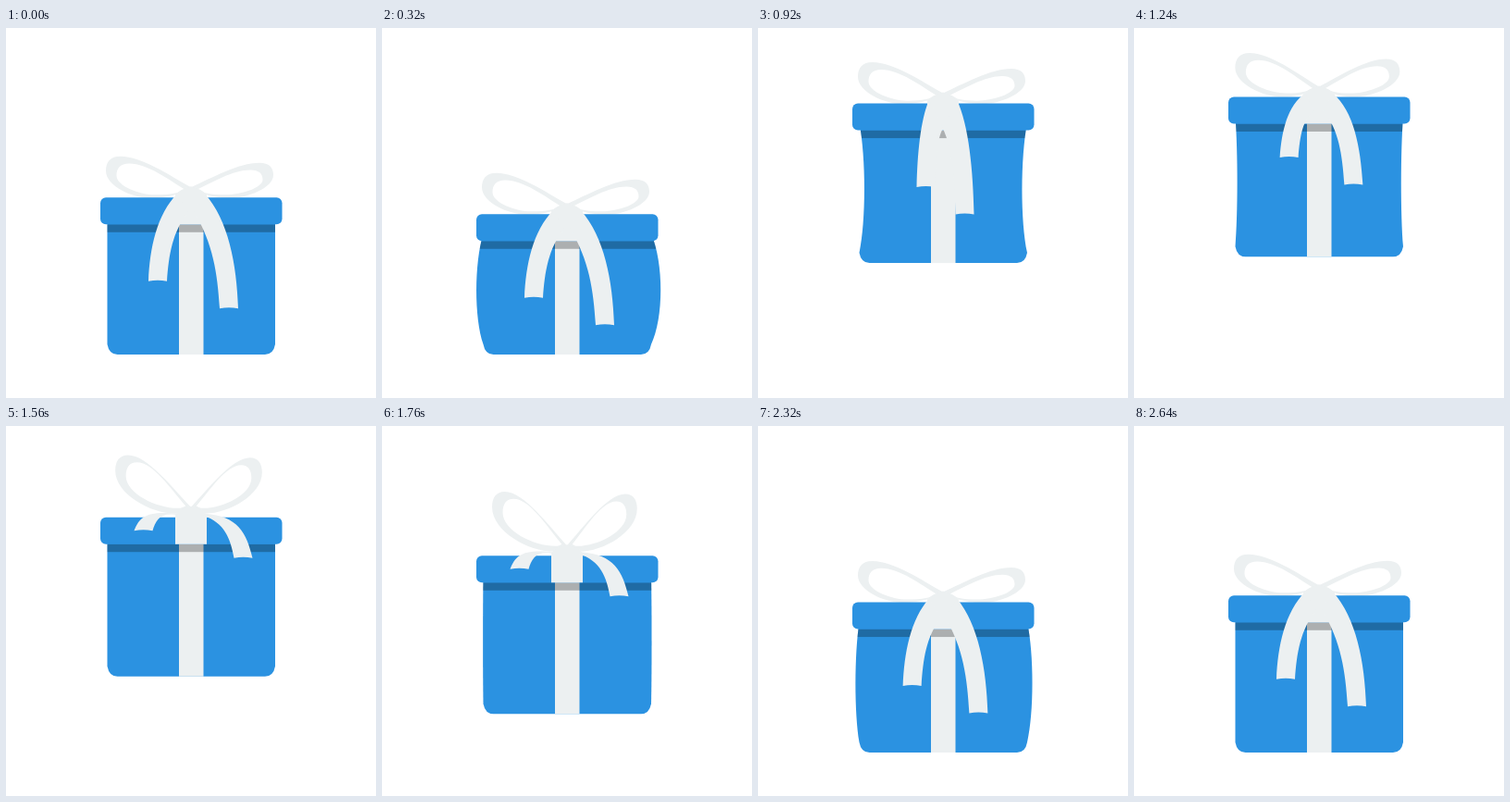
Recreate the animation shown at these times as an HTML page with a canvas. Size 400 by 400 pixels, loop 3.56 s.

```html
<!DOCTYPE html>
<html lang="en">
<head>
<meta charset="utf-8">
<title>Jumping gift</title>
<style>
  html, body { margin: 0; width: 100%; height: 100%; overflow: hidden; background: #fff; }
  canvas { display: block; }
</style>
</head>
<body>
<canvas id="stage" width="400" height="400"></canvas>
<script>
const ctx = document.getElementById('stage').getContext('2d');
const LOOP = 3560, STEP = 40, END = 2640;
const BLUE = '#2b92e1', RIBBON = '#ecf0f1', SHADE = 'rgba(0,0,0,.27)';
const GROUND = 353, BOX_HEIGHT = 169.7, LID = 29, JUMP = 106, APEX = 1200;

const mix = (a, b, k) => a + (b - a) * k;

// Smooth step from 0 at time a to 1 at time b.
function ease(t, a, b) {
  const u = Math.min(1, Math.max(0, (t - a) / (b - a)));
  return u * u * (3 - 2 * u);
}

// Rises from a to the peak, then returns to zero at b.
const pulse = (t, a, peak, b) => ease(t, a, peak) - ease(t, peak, b);

function pose(t) {
  const rest = t < APEX ? ((APEX - t) / 670) ** 3.1 : ((t - APEX) / 700) ** 2.25;
  const height = JUMP * Math.max(0, 1 - rest);
  const crouch = pulse(t, 0, 440, 720);
  return {
    height,
    squash: 22 * (crouch + pulse(t, 1870, 2080, 2470)) - 3 * height / JUMP,
    bulge: 12.6 * (crouch + pulse(t, 1720, 2040, 2560)) - 5.5 * pulse(t, 600, 920, 1480),
    loopsUp: 1.15 * pulse(t, 1120, 1680, 2330) - .2 * pulse(t, 480, 640, 920),
    tailsIn: pulse(t, 360, 920, 1560) + .15 * pulse(t, 2100, 2320, 2640),
    tailsUp: ease(t, 1040, 1560) - ease(t, 1900, 2320)
  };
}

function fill(path, color, rule = 'nonzero') {
  ctx.fillStyle = color;
  ctx.fill(new Path2D(path), rule);
}

// One closed outline of a bow loop; an inset gives the hole inside it.
function loopOutline(side, reach, rise, up, inset) {
  const farX = side * (reach - inset), topY = -(rise - inset * .68);
  const topX = farX * .83, farY = topY * mix(.65, .75, up);
  const knotX = side * inset / 2, knotY = -11 + inset * mix(.25, -.1, up);
  const lowX = farX * mix(.48, .21, up), lowY = mix(.5, -4, up) - inset * mix(.3, .5, up);
  return `M${knotX} ${knotY}
    C${mix(knotX, topX, .3)} ${mix(knotY, topY, .38)} ${topX * .7} ${topY} ${topX} ${topY}
    C${mix(topX, farX, .7)} ${topY} ${farX} ${mix(farY, topY, .6)} ${farX} ${farY}
    C${farX} ${mix(farY, lowY, .55)} ${mix(farX, lowX, .6)} ${lowY} ${lowX} ${lowY}
    C${mix(lowX, knotX, .5)} ${lowY} ${mix(lowX, knotX, .8)} ${mix(lowY, knotY, .5)}
     ${knotX} ${knotY}Z`;
}

function drawLoop(side, reach, rise, up) {
  const outline = inset => loopOutline(side, reach, rise, up, inset);
  fill(outline(0) + outline(11.5), RIBBON, 'evenodd');
}

// A ribbon end that hangs from the knot and can swing inward or fly up.
function drawTail(side, spread, length, inward, up) {
  const tip = spread - 17.5 * inward + 15.5 * up, inner = tip - 20;
  const drop = length - 76 * up;
  const at = (x, y) => `${side * x} ${y} `;
  fill('M' + at(15, -4)
    + 'C' + at(mix(15, tip, .7), drop * .2 - 10 * up)
    + at(tip * (.97 - .07 * up), drop * .6 - 10 * up) + at(tip, drop)
    + 'Q' + at(tip - 10, drop - 2) + at(inner, drop)
    + 'C' + at(inner * .92, drop * .68 - 7 * up) + at(inner * .78, drop * .42 - 13 * up)
    + at(3 - 3 * inward + 10 * up, 15 + 12 * inward - 17 * up) + 'Z', RIBBON);
}

function bodyPath(top, bottom, bulge) {
  const left = 109.5, right = 291, low = bottom - 11, corner = 11;
  const out = bulge * 4 / 3, outLeft = bulge > 0 ? out * .72 : out;
  const y1 = mix(top, low, .27), y2 = mix(top, low, .76);
  return `M${left} ${top}C${left - outLeft} ${y1} ${left - outLeft} ${y2} ${left} ${low}
    Q${left + 2} ${bottom} ${left + corner} ${bottom}H${right - corner}
    Q${right - 2} ${bottom} ${right} ${low}
    C${right + out} ${y2} ${right + out} ${y1} ${right} ${top}Z`;
}

function draw(t) {
  const { height, squash, bulge, loopsUp, tailsIn, tailsUp } = pose(t);
  const bottom = GROUND - height;
  const lidTop = bottom - BOX_HEIGHT + squash;
  const lidBottom = lidTop + LID;

  ctx.clearRect(0, 0, 400, 400);

  ctx.save();
  const body = bodyPath(lidBottom - 8, bottom, bulge);
  fill(body, BLUE);
  ctx.fillStyle = RIBBON;
  ctx.fillRect(187, lidBottom - 5, 26.5, bottom - lidBottom + 5);
  ctx.clip(new Path2D(body));
  ctx.fillStyle = SHADE;
  ctx.fillRect(90, lidBottom, 220, 8.5);
  ctx.restore();

  ctx.save();
  ctx.translate(200, lidTop);
  drawLoop(-1, 92 - 10 * loopsUp, 44.5 + 22.5 * loopsUp, loopsUp);
  drawLoop(1, 89 - 12 * loopsUp, 37.5 + 26.5 * loopsUp, loopsUp);

  ctx.fillStyle = BLUE;
  ctx.beginPath();
  ctx.roundRect(-98, 0, 196.5, LID, 6);
  ctx.fill();

  fill(`M-17 ${LID}V-3Q-12 -9 0 -12Q12 -9 17 -3V${LID}Z`, RIBBON);
  drawTail(-1, 46, 90.5, tailsIn, tailsUp);
  drawTail(1, 51, 120, tailsIn, tailsUp);
  ctx.restore();
}

const start = performance.now();
function tick() {
  const t = (performance.now() - start) % LOOP;
  draw(Math.min(END, Math.floor(t / STEP) * STEP));
  requestAnimationFrame(tick);
}
tick();
</script>
</body>
</html>
```
